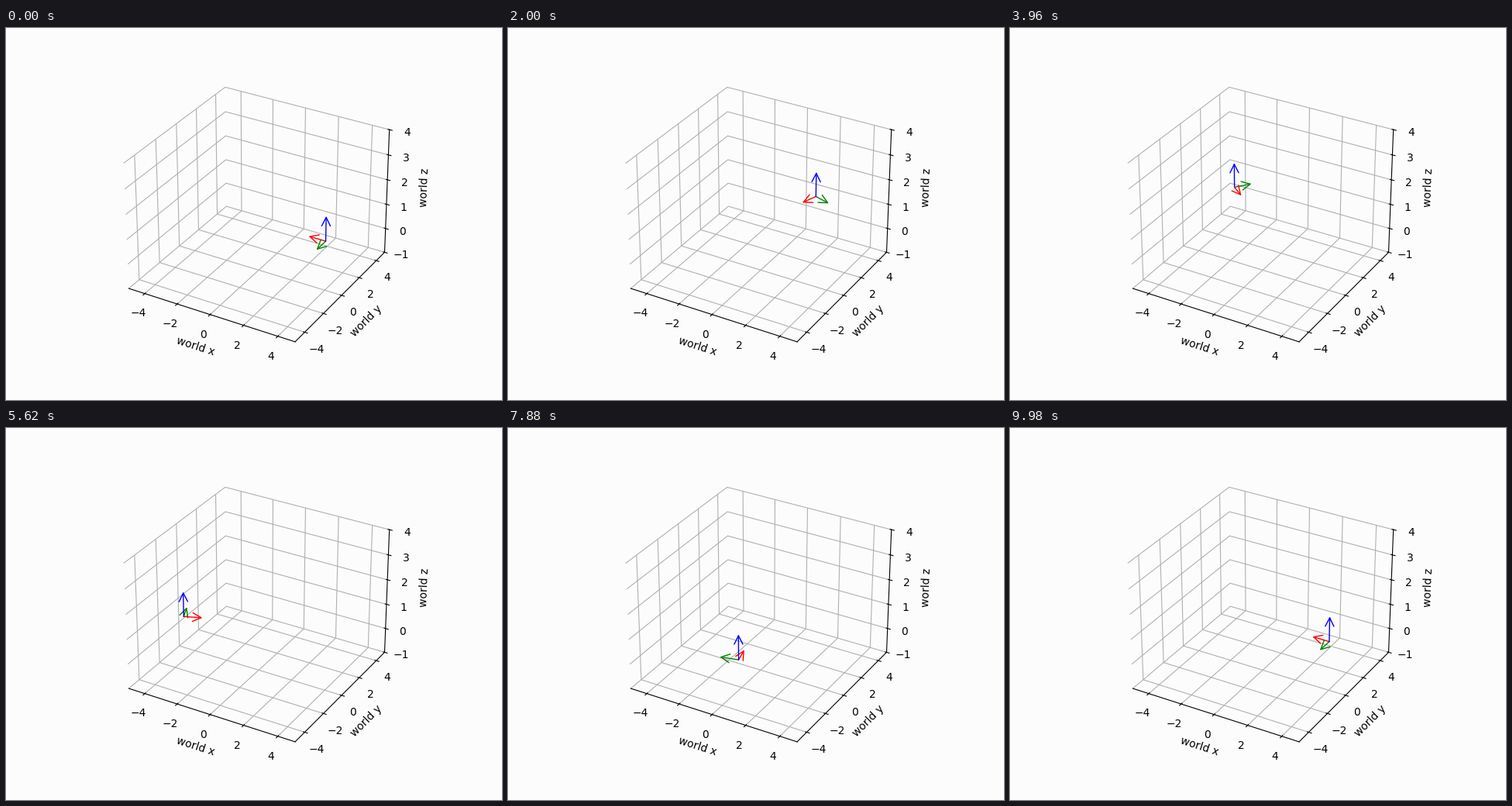
Recreate the animation shown at these times as a matplotlib script. Size 640 by 480 pixels, loop 10000 ms.

```python
import numpy as np
import matplotlib.pyplot as plt
from matplotlib.animation import FuncAnimation
from matplotlib.patches import FancyArrowPatch
from matplotlib.transforms import IdentityTransform
from mpl_toolkits.mplot3d import proj3d

FRAMES = 500
INTERVAL = 20
RADIUS = 4
HEIGHT = 1
WIDTH_PX, HEIGHT_PX, PAD_PX = 640, 480, 15
PAPER = "#fcfcfc"

fig = plt.figure(figsize=(6.4, 4.8), dpi=100, facecolor=PAPER)


def make_world():
    pad_x, pad_y = PAD_PX / WIDTH_PX, PAD_PX / HEIGHT_PX
    ax = fig.add_axes([pad_x, pad_y, 1 - 2 * pad_x, 1 - 2 * pad_y],
                      projection="3d", facecolor=PAPER)
    ax.set_box_aspect(None, zoom=0.85)
    ax.set(xlim=(-5, 5), ylim=(-5, 5), zlim=(-1, 4),
           xlabel="world x", ylabel="world y", zlabel="world z")
    for axis in (ax.xaxis, ax.yaxis, ax.zaxis):
        axis.set_pane_color((1, 1, 1, 0))
    return ax


def make_arrow(color):
    arrow = FancyArrowPatch((0, 0), (1, 1), arrowstyle="->", mutation_scale=20,
                            shrinkA=0, shrinkB=0, color=color,
                            transform=IdentityTransform())
    return fig.add_artist(arrow)


# The world never changes, so render it once and keep it as a backdrop.
world = make_world()
fig.canvas.draw()
projection = world.get_proj()
to_pixels = world.transData.frozen()
backdrop = np.array(fig.canvas.buffer_rgba())
world.remove()
fig.figimage(backdrop, origin="upper", zorder=0)

arrows = [make_arrow(color) for color in ("r", "g", "b")]


def project(point):
    """Return the pixel position and the depth of a world point."""
    x, y, depth = proj3d.proj_transform(*point, projection)
    return to_pixels.transform((x, y)), depth


def update(frame):
    angle = 2 * np.pi * frame / FRAMES
    c, s = np.cos(angle), np.sin(angle)
    origin = np.array([RADIUS * c, RADIUS * s, HEIGHT])
    # The body's x axis always faces the middle of the circle.
    body_axes = np.array([[-c, -s, 0], [s, -c, 0], [0, 0, 1]])

    start, start_depth = project(origin)
    depths = []
    for arrow, direction in zip(arrows, body_axes):
        tip, tip_depth = project(origin + direction)
        arrow.set_positions(start, tip)
        depths.append(min(start_depth, tip_depth))

    # Farthest arrow is painted first.
    order = sorted(range(3), key=lambda k: depths[k], reverse=True)
    for rank, k in enumerate(order):
        arrows[k].set_zorder(5 + rank)
    return arrows


anim = FuncAnimation(fig, update, frames=FRAMES, interval=INTERVAL,
                     repeat=True, repeat_delay=0, blit=False)
plt.show()
```
